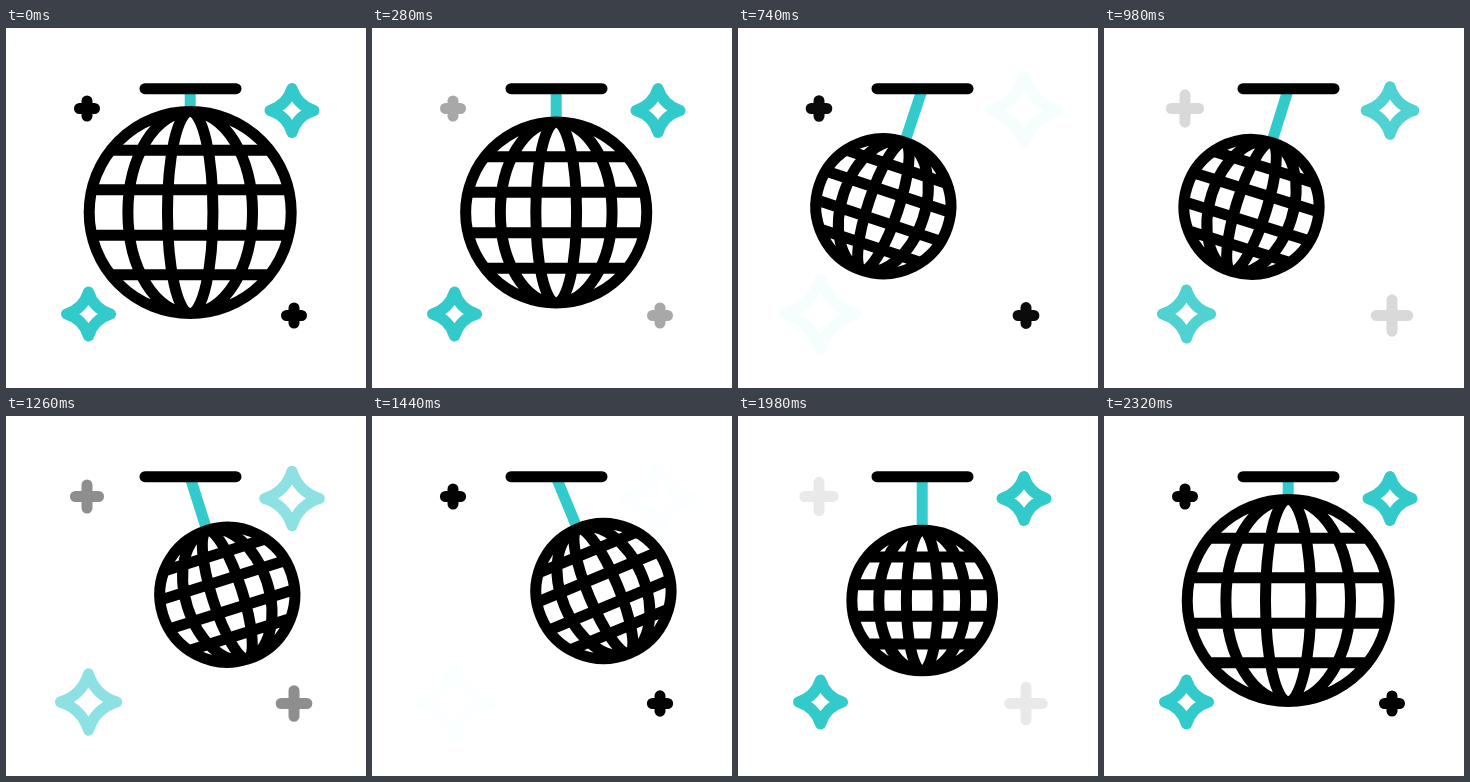
These frames come from a looping animation (360 by 360 pixels, 2.4 s). An HTML page with a canvas:

```html
<!DOCTYPE html>
<html lang="en">
<head>
<meta charset="utf-8">
<title>Disco ball</title>
<style>
html, body { margin: 0; width: 100%; height: 100%; overflow: hidden; background: #fff; }
canvas { display: block; width: 360px; height: 360px; }
</style>
</head>
<body>
<canvas id="stage" width="360" height="360"></canvas>
<script>
const ctx = document.getElementById('stage').getContext('2d');
const LOOP = 2400, BLACK = '#000', TEAL = '#33cacb';
const PIVOT = { x: 184.2, y: 61.5 }, CORD = 123;
let time = 0;

// Smooth step from 0 to 1 between two times
function ease(from, to) {
  const u = Math.min(1, Math.max(0, (time - from) / (to - from)));
  return (1 - Math.cos(Math.PI * u)) / 2;
}

const bump = (start, peak, end) => ease(start, peak) - ease(peak, end);

// Two pulses from 0 to 1 and back
const twinkle = (start, end) => bump(start, 690, 1080) + bump(1080, 1470, end);

// 1 at both ends of the loop, 0 in between
const rest = outEnd => 1 - ease(130, outEnd) + ease(1900, 2330);

function stroke(color, alpha, trace) {
  ctx.globalAlpha = alpha;
  ctx.strokeStyle = color;
  ctx.beginPath();
  trace();
  ctx.stroke();
}

function line(x1, y1, x2, y2) {
  ctx.moveTo(x1, y1);
  ctx.lineTo(x2, y2);
}

function star(x, y, growth, fade) {
  const tip = 22 + growth * fade, bend = tip * 0.237;
  stroke(TEAL, 1 - fade, () => {
    ctx.moveTo(x + tip, y);
    for (let i = 0; i < 4; i++) {
      const cos = Math.cos(i * Math.PI / 2), sin = Math.sin(i * Math.PI / 2);
      ctx.quadraticCurveTo(x + bend * (cos - sin), y + bend * (sin + cos), x - tip * sin, y + tip * cos);
    }
    ctx.closePath();
  });
}

function plus(x, y, growth, alpha) {
  const arm = 7.5 + (time > 690 ? growth * (1 - alpha) : 0);
  stroke(BLACK, alpha, () => {
    line(x - arm, y, x + arm, y);
    line(x, y - arm, x, y + arm);
  });
}

function ball(radius, degrees) {
  const meridian = rx => {
    ctx.moveTo(rx, CORD);
    ctx.ellipse(0, CORD, rx, radius, 0, 0, 2 * Math.PI);
  };
  ctx.save();
  ctx.translate(PIVOT.x, PIVOT.y);
  ctx.rotate(degrees * Math.PI / 180);
  stroke(TEAL, 1, () => line(0, 0, 0, CORD - radius));
  stroke(BLACK, 1, () => {
    meridian(radius);
    for (const ratio of [0.225, 0.617]) {
      const offset = radius * ratio, half = Math.sqrt(radius ** 2 - offset ** 2);
      meridian(offset);
      line(-half, CORD - offset, half, CORD - offset);
      line(-half, CORD + offset, half, CORD + offset);
    }
  });
  ctx.restore();
}

function draw(now) {
  time = now % LOOP;
  ctx.clearRect(0, 0, 360, 360);
  ctx.lineWidth = 11;
  ctx.lineCap = ctx.lineJoin = 'round';

  const swing = ease(510, 850) - 2 * ease(850, 1390) + ease(1390, 1715);
  ball(67.5 + 33.5 * rest(530), 24 * swing);
  stroke(BLACK, 1, () => line(139, 60.7, 230, 60.7));

  const fade = twinkle(300, 1960);
  star(286, 82.5, 12, fade);
  star(82.5, 286, 13.8, fade);

  const alpha = rest(380) + twinkle(380, 1900);
  plus(81, 80.5, 7.3, alpha);
  plus(288, 287.5, 9.6, alpha);

  requestAnimationFrame(draw);
}

requestAnimationFrame(draw);
</script>
</body>
</html>
```
